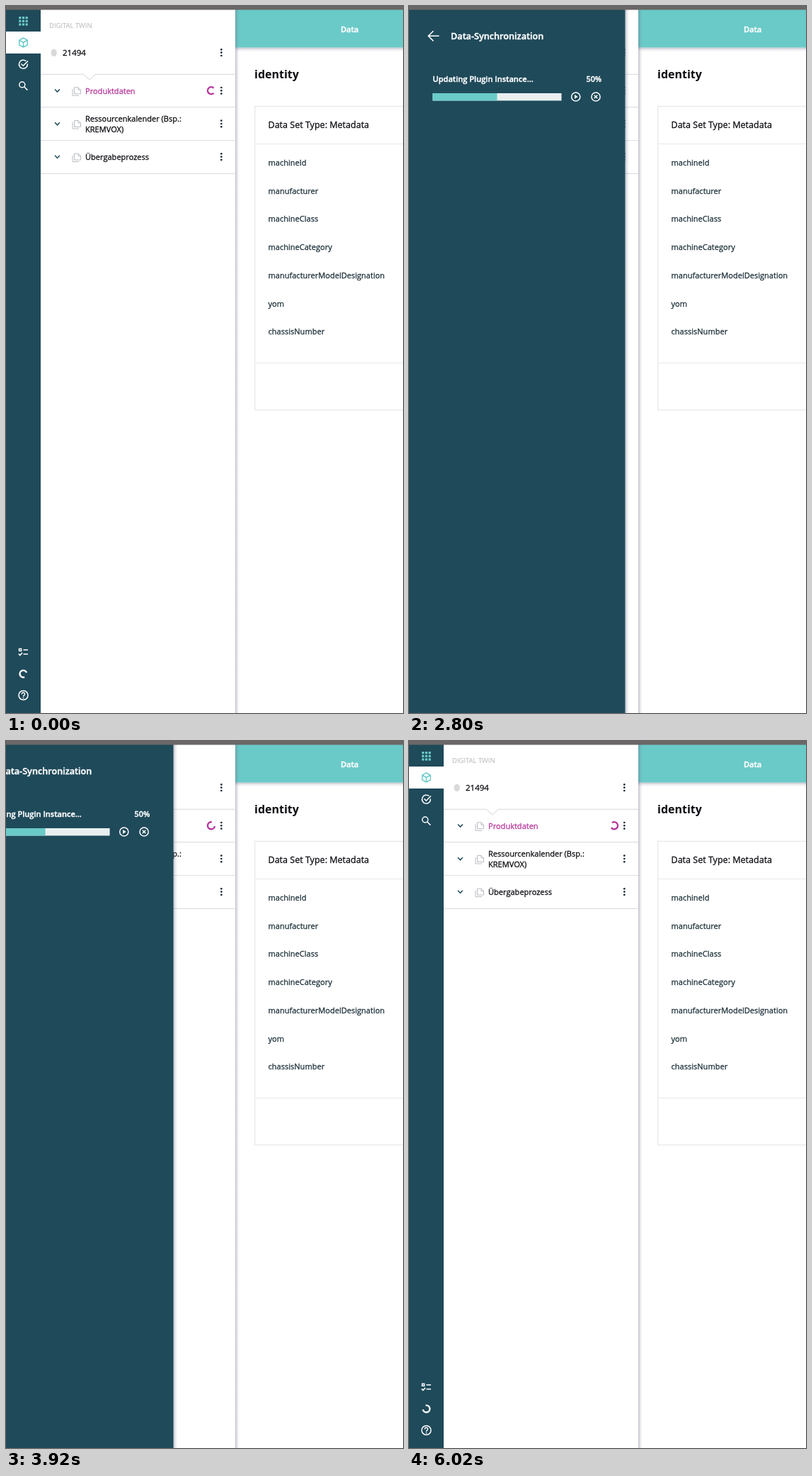
An HTML page for the animation above (6.09 s loop, 561 px wide and 997 px high).

```html
<!DOCTYPE html>
<html lang="en">
<head>
<meta charset="utf-8">
<style>
  html, body { margin: 0; height: 100%; overflow: hidden; background: #fff; }
  svg { display: block; width: 100%; height: 100%; }
  text { font: 400 11.06px "Open Sans", "Noto Sans", sans-serif; fill: #0c0c12; stroke: #0c0c12; stroke-width: .28px; white-space: pre; }
  .field text { fill: #1c2f38; stroke: #1c2f38; }
  .caption { font-size: 9.45px; fill: #b4b6ba; stroke: none; }
  .active { fill: #b5359c; stroke: #b5359c; }
  .semi { font-weight: 600; fill: #fff; stroke: #fff; stroke-width: .4px; }
  .line { fill: none; stroke: #dfe0e4; }
  .faint { stroke: #e8e9eb; }
  .icon { fill: none; stroke: #fff; stroke-width: 1.5; }
  .dark { stroke: #1f4a5a; }
  .teal { stroke: #6acac8; }
  .ring { fill: none; stroke-width: 2.4; stroke-dasharray: 3 1; }
</style>
</head>
<body>
<svg viewBox="0 0 561 997">
  <defs>
    <linearGradient id="shadeRight">
      <stop offset="0" stop-color="#6a6a88" stop-opacity=".42"/>
      <stop offset=".5" stop-color="#6a6a88" stop-opacity=".13"/>
      <stop offset="1" stop-color="#6a6a88" stop-opacity="0"/>
    </linearGradient>
    <linearGradient id="shadeDown" href="#shadeRight" x2="0" y2="1"/>
    <g id="dots" fill="#1c2b36">
      <circle cy="-4.3" r="1.35"/><circle r="1.35"/><circle cy="4.3" r="1.35"/>
    </g>
    <path id="chevron" class="icon dark" d="M-3.4 -1.8L0 1.8L3.4 -1.8"/>
    <g id="files" fill="none" stroke="#b9bcc2">
      <path d="M-3 -5.5H2.5L6 -2V3.5H-3ZM2.5 -5.5V-2H6"/>
      <path d="M-5.5 -3V6H3.5"/>
    </g>
  </defs>

  <rect width="561" height="997" fill="#fff"/>

  <!-- content -->
  <rect x="324" y="58.5" width="237" height="6" fill="url(#shadeDown)"/>
  <rect x="324" y="5" width="237" height="53.5" fill="#6acac8"/>
  <text class="semi" x="473" y="36.5">Data</text>
  <text x="351" y="101.5" style="font-size:16px;font-weight:700;stroke:none">identity</text>
  <path class="line faint" stroke-width="1.3" d="M570 141.5H351.7V569.7H570"/>
  <path class="line faint" d="M352 194.5H561M352 503.5H561"/>
  <text x="370.5" y="172" style="font-size:12.56px">Data Set Type: Metadata</text>
  <g class="field" id="fields"></g>
  <rect x="324" y="5" width="6" height="992" fill="url(#shadeRight)"/>

  <!-- tree -->
  <text class="caption" x="61" y="31">DIGITAL TWIN</text>
  <ellipse cx="67.7" cy="66" rx="4.3" ry="5.2" fill="#dcdcdd"/>
  <path d="M65.5 63q2.3 -2 4.5 0M65 66q2.7 -2 5.4 0M65.6 69q2.2 -1.6 4.4 0" fill="none" stroke="#cacacc" stroke-width=".6"/>
  <text x="80" y="70" style="font-size:11.5px">21494</text>
  <path class="line" stroke-width="1.2" d="M49 96.3H109.5L118 104L126.5 96.3H324M49 142.7H324M49 189.5H324M49 236.3H324"/>
  <text class="active" x="112" y="124">Produktdaten</text>
  <text x="112" y="162.5">Ressourcenkalender (Bsp.:</text>
  <text x="112" y="178.3">KREMVOX)</text>
  <text x="112" y="217">Übergabeprozess</text>
  <g id="rows"></g>
  <circle id="treeRing" class="ring" r="5" pathLength="4" stroke="#b5359c"/>

  <!-- navigation -->
  <rect y="5" width="49" height="992" fill="#1f4a5a"/>
  <rect y="36" width="49" height="31" fill="#fff"/>
  <g id="grid" fill="#6acac8"></g>
  <path class="icon teal" stroke-width="1.4" stroke-linejoin="round" d="M24.5 45L30.3 48.2V54.8L24.5 58L18.7 54.8V48.2ZM18.7 48.2L24.5 51.5L30.3 48.2M24.5 51.5V58"/>
  <path class="icon" d="M28.3 77.6A6 6 0 1 0 30.4 81.5M21.5 81.5L24.3 84.3L31 77.4"/>
  <circle class="icon" cx="22.8" cy="111" r="4"/>
  <path class="icon" stroke-width="1.9" d="M25.8 114L30.4 118.6"/>
  <path class="icon" d="M24.5 908H31M24.5 914H31M17.8 913.6L19.9 915.6L23 912"/>
  <rect class="icon" x="18.6" y="906.4" width="3" height="3"/>
  <rect id="syncItem" y="926" width="49" height="30.5" fill="#fff"/>
  <circle id="navRing" class="ring" r="4.9" pathLength="4"/>
  <circle class="icon" cx="24.5" cy="972" r="6.5"/>
  <path class="icon" stroke-width="1.3" d="M22.4 970.6A2.1 2.1 0 1 1 25.6 972.1Q24.5 972.8 24.5 974M24.5 975V976.4"/>

  <!-- sync drawer -->
  <g id="drawer">
    <rect x="305.5" y="5" width="6" height="992" fill="url(#shadeRight)"/>
    <rect y="5" width="305.5" height="992" fill="#1f4a5a"/>
    <path class="icon" stroke-width="1.8" d="M42.5 42.3H27.5M34.5 35.2L27.3 42.3L34.5 49.4"/>
    <text class="semi" x="59" y="46.5" style="font-size:12.66px">Data-Synchronization</text>
    <text class="semi" x="33.5" y="106.5">Updating Plugin Instance...</text>
    <text class="semi" x="250.5" y="106.5" style="font-size:10.8px">50%</text>
    <rect x="33.5" y="123" width="182" height="10.5" fill="#e9eff1"/>
    <rect x="33.5" y="123" width="91" height="10.5" fill="#6acac8"/>
    <circle class="icon" cx="235.7" cy="128" r="6.1"/>
    <path d="M234 125.1V130.9L238.6 128Z" fill="#fff"/>
    <circle class="icon" cx="264" cy="128" r="6.1"/>
    <path class="icon" d="M261.7 125.7L266.3 130.3M266.3 125.7L261.7 130.3"/>
  </g>

  <rect width="561" height="5.4" fill="#6b6767"/>
</svg>
<script>
const LOOP = 6090, STEP = 70, SLIDE = 300, TURN = 800, DRAWER_WIDTH = 305.5;
const $ = id => document.getElementById(id);
const use = (name, x, y) => `<use href="#${name}" x="${x}" y="${y}"/>`;

$('fields').innerHTML = ['machineId', 'manufacturer', 'machineClass', 'machineCategory',
  'manufacturerModelDesignation', 'yom', 'chassisNumber']
  .map((name, i) => `<text x="370.5" y="${225 + i * 39.7}">${name}</text>`).join('');

$('rows').innerHTML = use('dots', 304.3, 65.7) + [119.3, 166, 212.6]
  .map(y => use('chevron', 72.5, y) + use('files', 99.5, y + 1) + use('dots', 304.3, y)).join('');

$('grid').innerHTML = Array.from({ length: 9 }, (_, i) =>
  `<rect x="${18.2 + i % 3 * 4.7}" y="${15 + Math.floor(i / 3) * 4.7}" width="3.2" height="3.2"/>`).join('');

// cubic-bezier(.25, .1, .25, 1), solved by bisection
function ease(x) {
  if (x <= 0) return 0;
  if (x >= 1) return 1;
  let low = 0, high = 1, s;
  for (let i = 0; i < 20; i++) {
    s = (low + high) / 2;
    if (.75 * s * (1 - s) + s ** 3 < x) low = s; else high = s;
  }
  return .3 * s * (1 - s) ** 2 + 3 * s * s * (1 - s) + s ** 3;
}

const slide = (t, start) => ease((t - start) / SLIDE);
const within = (t, from, to) => t >= from && t < to;

function placeRing(id, x, y, gapAngle) {
  $(id).setAttribute('transform', `translate(${x} ${y}) rotate(${gapAngle + 45})`);
}

function draw(t) {
  const open = slide(t, 1506.4) - slide(t, 2800) + slide(t, 3778) - slide(t, 4728);
  $('drawer').setAttribute('transform', `translate(${DRAWER_WIDTH * (open - 1)})`);
  $('drawer').setAttribute('visibility', open > .001 ? 'visible' : 'hidden');

  const hovered = within(t, 1330, 1700) || within(t, 3400, 4000);
  const focused = within(t, 2800, 3400) || within(t, 4728, 5400);
  $('syncItem').setAttribute('opacity', hovered ? .25 : focused ? .85 : 0);
  $('navRing').setAttribute('stroke', hovered ? '#6acac8' : '#fff');

  const angle = t / TURN * 360;
  placeRing('treeRing', 290, 119.3, angle);
  placeRing('navRing', 24.5, 941.8, angle + 25);
}

function tick() {
  draw(Math.floor(performance.now() % LOOP / STEP) * STEP);
  requestAnimationFrame(tick);
}
tick();
</script>
</body>
</html>
```
